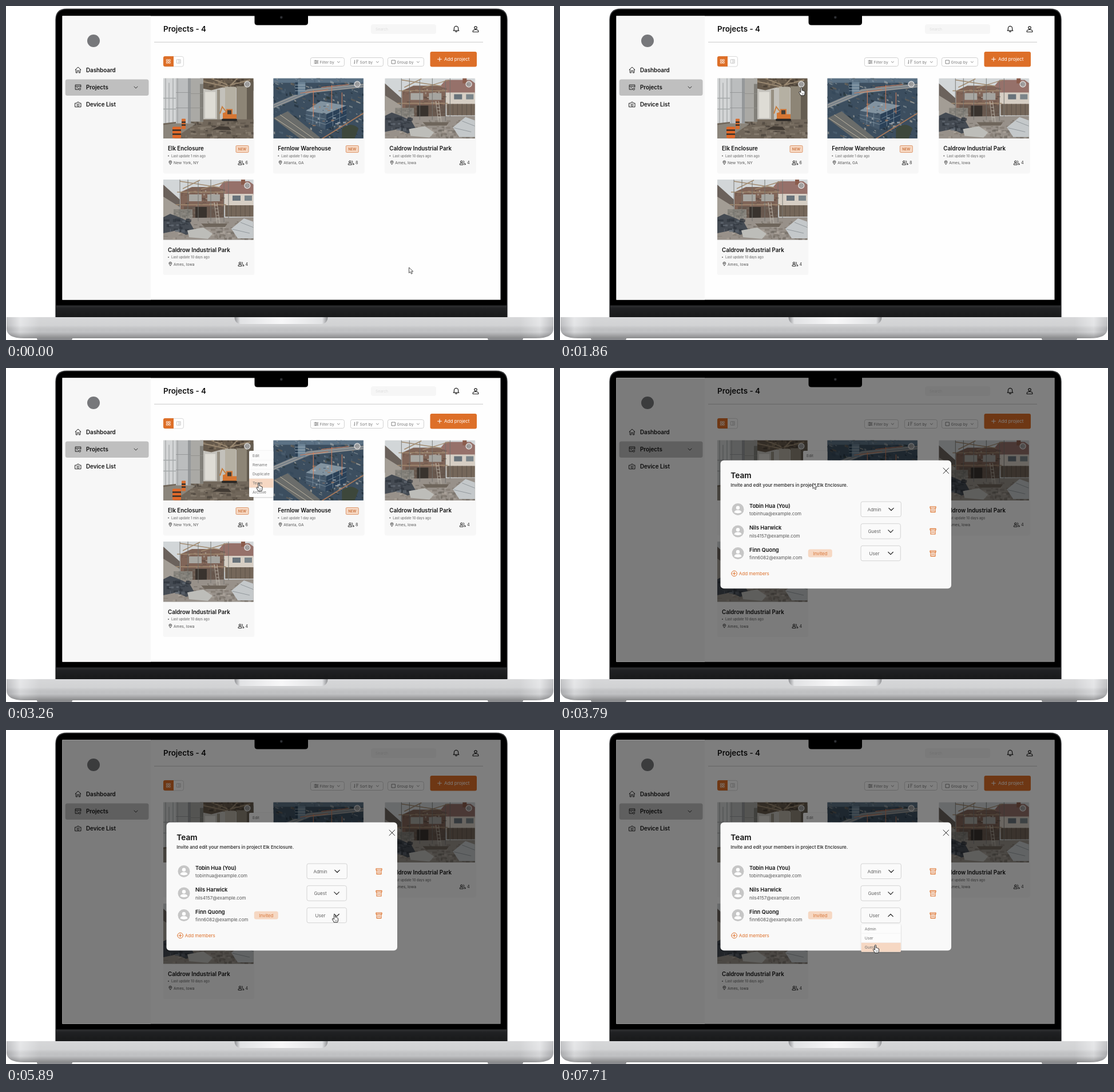
An HTML page that plays this animation: 958x585 px, repeating every 8000 ms.

```html
<!DOCTYPE html>
<html lang="en">
<head>
<meta charset="utf-8">
<title>Project dashboard</title>
<style>
html, body { margin: 0; width: 100%; height: 100%; overflow: hidden; background: #fff; }
svg { display: block; width: 100vw; height: 100vh; font-family: Inter, "Open Sans", sans-serif; }
.icon { fill: none; stroke: #222; stroke-width: 1; stroke-linecap: round; stroke-linejoin: round; }
</style>
</head>
<body>
<svg id="stage" viewBox="0 0 958 585"></svg>
<script>
const ORANGE = '#dd6f28', PEACH = '#f6d8c3';
const LOOP = 8000;

const rect = (x, y, w, h, fill, r = 0, extra = '') =>
  `<rect x="${x}" y="${y}" width="${w}" height="${h}" rx="${r}" fill="${fill}" ${extra}/>`;
const text = (x, y, size, str, fill = '#111', weight = 400, extra = '') =>
  `<text x="${x}" y="${y}" font-size="${size}" font-weight="${weight}" fill="${fill}" ${extra}>${str}</text>`;
const shape = (d, fill, extra = '') => `<path d="${d}" fill="${fill}" ${extra}/>`;
const line = (d, color, width = 1) => shape(d, 'none', `stroke="${color}" stroke-width="${width}"`);
const icon = (x, y, d, extra = '') => `<path class="icon" transform="translate(${x} ${y})" d="${d}" ${extra}/>`;
const group = (x, y, body) => `<g transform="translate(${x} ${y})">${body}</g>`;
const border = (color, width = 1) => `stroke="${color}" stroke-width="${width}"`;
const chevron = (x, y, w, color, width, up = false) =>
  icon(x, y, up ? `M${-w} ${w / 2}L0 ${-w / 2}L${w} ${w / 2}` : `M${-w} ${-w / 2}L0 ${w / 2}L${w} ${-w / 2}`,
    `style="stroke:${color};stroke-width:${width}"`);

// Seeded small blocks that give a flat area some grain
function grain(seed, count, x, y, w, h, tones, size = 6) {
  const rnd = () => (seed = (seed * 16807) % 2147483647) / 2147483647;
  rnd();
  return Array.from({ length: count }, () => rect((x + rnd() * w).toFixed(1), (y + rnd() * h).toFixed(1),
    (1 + rnd() * size).toFixed(1), (1 + rnd() * size / 2).toFixed(1), tones[Math.floor(rnd() * tones.length)], 0, 'opacity=".65"')).join('');
}

// Photo stand-ins, 158 x 106 each
function viaduct() {
  return rect(0, 0, 158, 106, '#c3c1bb')
    + rect(0, 0, 24, 85, '#d3d5d6') + line('M4 0V80M10 8V80M17 0V80M0 35H24M0 54H24', '#a5a8a9', 1.3)
    + shape('M64 0H158V22L112 14L84 21L64 17Z', '#65594b')
    + line('M66 5L112 15M84 0L118 14M130 0L114 16M152 3L112 13', '#9b8a73', 2)
    + grain(5, 40, 66, 0, 88, 16, ['#41382e', '#8b7a64'])
    + rect(73, 24, 18, 46, '#dedcd5') + rect(94, 20, 5, 52, '#968f82') + rect(108, 15, 19, 50, '#b5b0a3')
    + rect(128, 14, 18, 64, '#8d8576') + rect(146, 6, 12, 74, '#655d51')
    + shape('M0 79L60 72L158 72V106H0Z', '#71675b')
    + grain(11, 110, 30, 74, 125, 30, ['#4a433b', '#8f8577', '#665c50'], 8)
    + shape('M0 82L42 76L56 80L18 106H0Z', '#8b857b')
    + rect(48, 0, 22, 76, '#aaa9a5') + rect(64, 10, 6, 66, '#82807a') + line('M48 27H70M48 52H70', '#8f8e8a', .8)
    + rect(22, 0, 26, 79, '#bbbdbe') + rect(43, 0, 5, 79, '#95989a')
    + line('M22 25H48M22 52H48M25 0V79', '#8d9091', .8)
    + shape('M86 90L98 84L114 85L119 91Z', '#413a33')
    + shape('M104 71V61L110 59V54H121V63H128V72H104Z', '#d67632') + rect(112, 56, 7, 7, '#453e35')
    + line('M110 59L103 50L99 62', '#c77f3f', 2) + rect(102, 71, 27, 4, '#282624', 2)
    + rect(16, 85, 15, 20, '#e0692a', 2) + rect(32, 71, 7, 18, '#d96e31', 1)
    + line('M16 91H31M16 98H31M32 77H39M32 82H39', '#36302b', 2.5);
}

function city() {
  const tones = ['#1f2d3a', '#34475a', '#506476', '#8c979c', '#b5b2a8', '#6b6255', '#2b3a3b'];
  return rect(0, 0, 158, 106, '#3c4e5f')
    + `<g transform="skewY(20)">${grain(29, 420, -5, -60, 165, 165, tones, 7)}</g>`
    + rect(0, 0, 158, 8, '#7c95ab', 0, 'opacity=".5"')
    + shape('M0 45L60 19L158 9V16L65 26L0 53Z', '#77818a')
    + line('M0 47L61 21L158 11M0 51L62 25L158 15', '#c0b5a5', .7)
    + rect(38, 7, 18, 22, '#6d8496') + rect(38, 7, 5, 22, '#2c4256') + line('M38 12H56M38 17H56M38 22H56', '#a5b3bd', .8)
    + shape('M0 70L25 58L82 104L79 106H47Z', '#6a6c6a') + line('M3 70L58 106M12 64L71 106', '#bdb4a2', 1)
    + shape('M57 57L83 40L128 48V74L91 90L57 76Z', '#46596b')
    + shape('M57 57L83 40L128 48L93 63Z', '#8293a0') + shape('M93 63L128 48V74L91 90Z', '#2b4158')
    + line('M57 64L92 72L128 55M57 70L91 81L128 64M69 60V80M81 62V84M104 58V84M116 53V79', '#7e92a0', .8)
    + grain(83, 40, 62, 43, 60, 40, ['#2a3d50', '#b7bec0', '#a57b60'], 5)
    + line('M85 106L158 61', '#a87859', 1.8)
    + shape('M120 88Q137 75 149 88L142 106H120Z', '#3d473b')
    + line('M70 21V68M47 26L96 20M102 12V54M84 16L132 11M120 25V62', '#d57c55', 1);
}

function house() {
  const stones = ['#6f6961', '#b1aaa0', '#827a70'];
  return rect(0, 0, 158, 106, '#d2d6d8')
    + shape('M0 9L29 35V57H0Z', '#6b625c') + shape('M0 30L29 48V66H0Z', '#a39d95')
    + shape('M92 20L106 3H150L158 9V27H98Z', '#96716a') + rect(136, 0, 7, 9, '#8b5c4c')
    + rect(103, 25, 55, 28, '#d6cec4') + rect(121, 28, 14, 9, '#68727a') + rect(142, 28, 13, 9, '#7b858a')
    + rect(108, 45, 50, 20, '#75675a') + line('M111 45V65M119 45V65M127 45V65M135 45V65M143 45V65M151 45V65', '#554c44', .7)
    + shape('M30 22L50 13H97L106 23V70H30Z', '#806558')
    + grain(41, 90, 30, 16, 74, 52, ['#5a4a41', '#a08575', '#6c554a', '#b5aca2'], 6)
    + rect(45, 26, 22, 12, '#a8a7a2') + rect(77, 26, 22, 12, '#a5a49f')
    + rect(36, 47, 70, 23, '#62554b', 0, 'opacity=".8"') + rect(56, 48, 20, 25, '#39332e')
    + rect(18, 52, 33, 24, '#85827b') + grain(17, 30, 18, 52, 30, 22, ['#6c6a65', '#9b978f'], 5)
    + shape('M0 72L50 67L158 66V106H0Z', '#98918a') + grain(7, 110, 0, 72, 155, 32, stones, 8)
    + line('M24 22H110M22 44H110M29 3L100 14M34 16L64 1M66 17L112 3', '#a28c72', 1.4)
    + line('M29 0V75M43 0V72M61 3V73M83 0V73M106 5V75M114 0V68', '#73736f', .9)
    + line('M89 40L94 79M94 40L99 79M90 45H94M91 51H96M92 57H97M93 63H97M93 69H98', '#c1bcb0', .8)
    + shape('M0 66L12 60L28 66L46 74L55 90L40 97L24 89L0 94Z', '#454b53')
    + grain(61, 30, 0, 68, 42, 20, ['#2c3239', '#69717a'], 9)
    + shape('M42 89L70 84L86 95L78 104L45 101Z', '#bdbdb9') + shape('M66 77H112L108 83H72Z', '#6e655b')
    + shape('M119 86L141 68L158 74V103H130Z', '#c4c8ca') + line('M121 87L151 94M135 75L158 84', '#92989c', 1);
}

function photoCard(x, y, photo, name, updated, place, people, isNew) {
  const pin = 'M0 3.3Q-2.4.4-2.4-.8A2.4 2.4 0 0 1 2.4-.8Q2.4.4 0 3.3M-.7-.8A.7.7 0 1 0 .7-.8A.7.7 0 1 0-.7-.8';
  const crowd = 'M-5 3V2Q-5 .3-2 .3T1 2V3ZM-3.7-2A1.7 1.7 0 1 0-.3-2A1.7 1.7 0 1 0-3.7-2M1.4-3.6A1.7 1.7 0 0 1 1.4-.4M2.6.5Q5 .6 5 3H3';
  const badge = rect(127, 118, 22, 12, PEACH, 1.5, border('#d98652', .8))
    + text(138, 126.2, 6, 'NEW', '#c9713c', 600, 'text-anchor="middle"');
  return group(x, y, rect(-.5, 0, 160, 167, '#f7f7f7', 4)
    + `<svg width="157.5" height="105.5" viewBox="0 0 157.5 105.5">${photo}</svg>`
    + `<circle cx="146.8" cy="10.5" r="5.8" fill="#dedede" opacity=".85"/>`
    + icon(146.8, 10.5, 'M-3.3 0A3.3 3.3 0 1 0 3.3 0A3.3 3.3 0 1 0-3.3 0M-1.4 0A1.4 1.4 0 1 0 1.4 0A1.4 1.4 0 1 0-1.4 0', 'style="stroke:#666;stroke-width:.9"')
    + text(8, 126.8, 9.7, name, '#111', 600) + (isNew ? badge : '')
    + `<circle cx="9" cy="136" r="1" fill="#666"/>` + text(14, 138, 5.8, `Last update ${updated}`, '#777', 500)
    + icon(12.3, 147.6, pin, 'style="stroke-width:.8"') + text(18, 150.6, 6.7, place, '#555')
    + icon(136, 148.2, crowd) + text(143.6, 150.8, 7.2, people, '#333'));
}

function navItem(y, label, glyph) {
  return icon(126, y, glyph) + text(140, y + 3.5, 9.8, label, '#111', 600);
}

function filterButton(x, w, label, glyph) {
  return rect(x, 90.5, w, 15, '#fff', 3, border('#c4c4c4', .8)) + icon(x + 10, 98, glyph, 'style="stroke:#666;stroke-width:.8"')
    + text(x + 16, 100.7, 6.7, label, '#7a7a7a') + chevron(x + w - 10, 98.2, 2, '#666', .8);
}

function dashboard() {
  const lot = ['Caldrow Industrial Park', '10 days ago', 'Ames, Iowa', 4];
  return rect(98.5, 17.4, 766, 497.2, '#fefefe') + rect(98.5, 17.4, 154.5, 497.2, '#f7f7f7')
    + `<circle cx="153" cy="61" r="11" fill="#77787b"/>`
    + rect(103.7, 128.4, 145.8, 28.6, '#bfbfbf', 3.5)
    + navItem(112, 'Dashboard', 'M-5-.2L0-5L5-.2M-3.7-1V5H-1.4V1.2H1.4V5H3.7V-1')
    + navItem(142.3, 'Projects', 'M0 4H-4.8V-4.3H4.8V0M-4.8-1.8H4.8M-2.5.8H-.5M1 3A1.8 1.8 0 1 0 4.6 3A1.8 1.8 0 1 0 1 3')
    + navItem(172.8, 'Device List', 'M-5-2.6H-2.3L-1.4-4.4H1.4L2.3-2.6H5V4H-5ZM-1.9.6A1.9 1.9 0 1 0 1.9.6A1.9 1.9 0 1 0-1.9.6')
    + chevron(227, 142.6, 3, '#333', 1)
    + text(275, 45, 13.4, 'Projects - 4', '#111', 600) + line('M259 63.3H834', '#c9c9c9')
    + rect(638, 32, 114, 17, '#f6f6f6', 4) + text(646, 43, 6.6, 'Search', '#dedede')
    + icon(787, 40.4, 'M-4.8 2.8H4.8L3.6.9V-1.4A3.6 3.6 0 0 0-3.6-1.4V.9ZM-1.3 4.3Q0 5.5 1.3 4.3', 'style="stroke-width:1.2"')
    + icon(821, 40.5, 'M-4.8 5V3.7Q-4.8 1 0 1T4.8 3.7V5ZM-2.3-2.4A2.3 2.3 0 1 0 2.3-2.4A2.3 2.3 0 1 0-2.3-2.4', 'style="stroke-width:1.2"')
    + rect(275.4, 88.4, 35, 17.6, '#fff', 3, border('#cfcfcf', .8))
    + shape('M293 88V106H278Q275 106 275 103V91Q275 88 278 88Z', ORANGE)
    + icon(284, 97, 'M-3.2-3.2H-.8V-.8H-3.2ZM.8-3.2H3.2V-.8H.8ZM-3.2.8H-.8V3.2H-3.2ZM.8.8H3.2V3.2H.8Z', 'style="stroke:#fff;stroke-width:.8"')
    + icon(302, 97, 'M-3.2-3.2H3.2V3.2H-3.2ZM0-3V3M1.3-1H2M1.3 1H2', 'style="stroke:#bbb;stroke-width:.8"')
    + filterButton(532.4, 59, 'Filter by', 'M-3.5-2.3H3.5M-3.5 0H3.5M-3.5 2.3H3.5M-1-3V-1.5M1.5-.8V.8M-1 1.5V3')
    + filterButton(602.4, 57, 'Sort by', 'M-3-3V3L-4 2M0-3H3.4M0-.6H2.5M0 1.8H1.5')
    + filterButton(667.4, 63, 'Group by', 'M-3-3H3V3H-3Z')
    + rect(741.5, 80, 81.5, 26.5, ORANGE, 3) + icon(758, 93.2, 'M-3.4 0H3.4M0-3.4V3.4', 'style="stroke:#fff"')
    + text(766, 96.2, 8.1, 'Add project', '#fff')
    + photoCard(275, 126.5, viaduct(), 'Elk Enclosure', '1 min ago', 'New York, NY', 6, true)
    + photoCard(467.3, 126.5, city(), 'Fernlow Warehouse', '1 day ago', 'Atlanta, GA', 8, true)
    + photoCard(662.3, 126.5, house(), ...lot) + photoCard(275, 304, house(), ...lot);
}

function dropList(id, x, y, w, labels) {
  const rows = labels.map((label, i) => rect(x, y + i * 16.2, w, 16.2, PEACH, 0, `class="hover" opacity="0"`)
    + text(x + 6, y + i * 16.2 + 10.6, 6.7, label, '#707070')
    + (i ? line(`M${x} ${y + i * 16.2}h${w}`, '#eee', .6) : '')).join('');
  return `<g id="${id}">${rect(x, y, w, labels.length * 16.2, '#fcfcfc', 2, 'filter="url(#shadow)"')}${rows}</g>`;
}

function member(y, name, email, role, boxWidth, invited) {
  return `<circle cx="311" cy="${y}" r="10.5" fill="#c6c6c6"/><circle cx="311" cy="${y - 2.7}" r="3.2" fill="#fff"/>`
    + shape(`M304.6 ${y + 5.6}Q304.8 ${y + 1.5} 311 ${y + 1.5}T317.4 ${y + 5.6}Q311 ${y + 8.5} 304.6 ${y + 5.6}`, '#fff')
    + text(331, y - 2.7, 9.3, name, '#111', 600) + text(331, y + 10.5, 8, email, '#555')
    + (invited ? rect(433.8, y - 7, 42, 14, PEACH, 3.5) + text(454.8, y + 3, 7.9, 'Invited', '#d8763a', 400, 'text-anchor="middle"') : '')
    + rect(526, y - 13.3, boxWidth, 26.4, '#fafafa', 3, border('#d3d3d3'))
    + text(549.5, y + 3.2, 8, role, '#606060', 400, 'text-anchor="middle"')
    + icon(652, y, 'M-5-4.6H5V-2.2H-5ZM-4-2.2V5H4V-2.2M-1.4 0V2.8M1.4 0V2.8', `style="stroke:${ORANGE};stroke-width:1.1"`);
}

function teamDialog() {
  return rect(98.5, 17.4, 766, 497.2, '#000', 0, 'opacity=".5"') + rect(280.5, 161.8, 403.5, 224.4, '#f9f9f9', 6)
    + text(298.3, 193, 13.7, 'Team', '#111', 600)
    + text(298.3, 208, 8, 'Invite and edit your members in project Elk Enclosure.', '#222', 500)
    + icon(674.8, 180, 'M-4.8-4.8L4.8 4.8M4.8-4.8L-4.8 4.8')
    + member(247.4, 'Tobin Hua (You)', 'tobinhua@example.com', 'Admin', 70.3)
    + member(286, 'Nils Harwick', 'nils4157@example.com', 'Guest', 69.3)
    + member(324.6, 'Finn Quong', 'finn6082@example.com', 'User', 69.3, true)
    + chevron(579, 247.4, 4.2, '#222', 1.2) + chevron(578, 286, 4.2, '#222', 1.2)
    + `<g id="closed">${chevron(578, 324.6, 4.2, '#222', 1.2)}</g><g id="opened">${chevron(578, 324.6, 4.2, '#222', 1.2, true)}</g>`
    + icon(304.6, 360, 'M-4.8 0A4.8 4.8 0 1 0 4.8 0A4.8 4.8 0 1 0-4.8 0M-2.4 0H2.4M0-2.4V2.4', `style="stroke:${ORANGE}"`)
    + text(312.8, 363, 8, 'Add members', ORANGE)
    + dropList('roles', 526.7, 340, 69, ['Admin', 'User', 'Guest']);
}

function gradient(id, vertical, stops) {
  return `<linearGradient id="${id}" ${vertical ? 'x2="0" y2="1"' : ''}>`
    + stops.map(([at, color, alpha = 1]) => `<stop offset="${at}" stop-color="${color}" stop-opacity="${alpha}"/>`).join('')
    + '</linearGradient>';
}

function laptop() {
  const base = 'M1 545H957V565Q957 582 926 582H32Q1 582 1 565Z';
  return shape('M86.3 545V24Q86.3 4.6 106 4.6H857Q876.7 4.6 876.7 24V545Z', '#38393b')
    + shape('M87.6 545V25Q87.6 6 107 6H856Q875.4 6 875.4 25V545Z', '#000')
    + rect(87.6, 524.5, 787.8, 20.5, 'url(#hinge)')
    + rect(54, 580, 62, 5, '#8c8d90', 2) + rect(842, 580, 62, 5, '#8c8d90', 2)
    + shape(base, 'url(#metal)') + shape(base, 'url(#shade)')
    + shape('M399.5 545H562.5Q562 557 550 557H412Q400 557 399.5 545Z', 'url(#lip)');
}

const notch = shape('M434.5 16V28.5Q434.5 33.5 439.5 33.5H523Q528 33.5 528 28.5V16Z', '#000')
  + '<circle cx="481.3" cy="20" r="2.4" fill="#252628"/><circle cx="481.3" cy="20" r="1" fill="#3a3d46"/>';
const arrow = shape('M0 0V9.6L2.4 7.5L4 11.2L5.8 10.4L4.2 6.9H7.2Z', '#fff', border('#222', .8));
const hand = shape('M-1.1 1.1Q-1.1 0 0 0T1.1 1.1V5Q2.6 4.4 3 5.6Q4.3 5 4.7 6.2Q6 5.9 6 7.4V10Q6 12 5 13.8H-1.3Q-2 11.8-3.7 9.3Q-4.8 7.6-3.5 7.2Q-2.5 7-1.1 8.8Z',
  '#fff', border('#111', .9) + ' stroke-linejoin="round"') + line('M1.4 9.5V12M3.3 9.5V12', '#333', .6);

const stage = document.getElementById('stage');
stage.innerHTML = '<defs>'
  + gradient('hinge', true, [[0, '#303133'], [.25, '#202123'], [1, '#18191a']])
  + gradient('metal', false, [[0, '#b0b1b4'], [.025, '#dfe0e2'], [.06, '#c9cacc'], [.94, '#c9cacc'], [.975, '#dfe0e2'], [1, '#b0b1b4']])
  + gradient('shade', true, [[0, '#fff', .25], [.4, '#fff', .15], [.7, '#000', .04], [1, '#000', .32]])
  + gradient('lip', false, [[0, '#8e8f92'], [.06, '#e1e2e4'], [.5, '#f7f7f8'], [.94, '#e1e2e4'], [1, '#8e8f92']])
  + '<filter id="shadow" x="-20%" y="-20%" width="140%" height="140%"><feDropShadow dx="0" dy=".7" stdDeviation="1.2" flood-opacity=".25"/></filter></defs>'
  + laptop() + dashboard()
  + dropList('menu', 425, 145, 42.5, ['Edit', 'Rename', 'Duplicate', 'Team', 'Archive'])
  + `<g id="dialog">${teamDialog()}</g>${notch}`
  + `<g id="cursor"><g id="arrow">${arrow}</g><g id="hand">${hand}</g></g>`;

const part = id => document.getElementById(id);
const show = (id, on) => part(id).setAttribute('visibility', on ? 'inherit' : 'hidden');

// Pointer stops: time, x, y
const path = [
  [0, 704.5, 458], [79, 704.5, 458], [80, 701, 456], [230, 701, 456], [380, 562, 401], [540, 562, 401],
  [930, 424, 224], [1090, 424, 224], [1540, 421.5, 147], [1660, 421.5, 147], [1860, 422, 143], [2570, 422, 143],
  [3260, 442, 201.5], [4600, 442.2, 202], [5040, 493.5, 278.5], [5350, 493.5, 278.5], [5890, 574.5, 323],
  [6760, 574.5, 323], [6990, 567.5, 347.5], [7540, 551, 375.5], [7710, 551.5, 376.5], [LOOP, 551.5, 376.5]
];

function pointerAt(t) {
  const i = path.findIndex(stop => stop[0] > t);
  const [t0, x0, y0] = path[i - 1], [t1, x1, y1] = path[i];
  const k = (t - t0) / (t1 - t0);
  return [x0 + (x1 - x0) * k, y0 + (y1 - y0) * k];
}

function highlight(id, top, y, on) {
  const row = Math.floor((y - top) / 16.2);
  part(id).querySelectorAll('.hover').forEach((bar, i) => bar.setAttribute('opacity', on && i === row ? 1 : 0));
}

function update(t) {
  const [x, y] = pointerAt(t);
  const pointing = (t >= 1480 && t < 3790) || (t >= 5740 && t < 6830) || t >= 7060;
  part('cursor').setAttribute('transform', `translate(${x} ${y})`);
  show('arrow', !pointing);
  show('hand', pointing);
  show('menu', t >= 2260);
  highlight('menu', 145, y, t < 3790);
  show('dialog', t >= 3790);
  const open = t >= 6360;
  show('closed', !open);
  show('opened', open);
  show('roles', open);
  part('roles').setAttribute('opacity', t < 6450 ? .5 : 1);
  highlight('roles', 340, y, t >= 7060);
}

const start = performance.now();
function tick() {
  update((performance.now() - start) % LOOP);
  requestAnimationFrame(tick);
}
tick();
</script>
</body>
</html>
```
